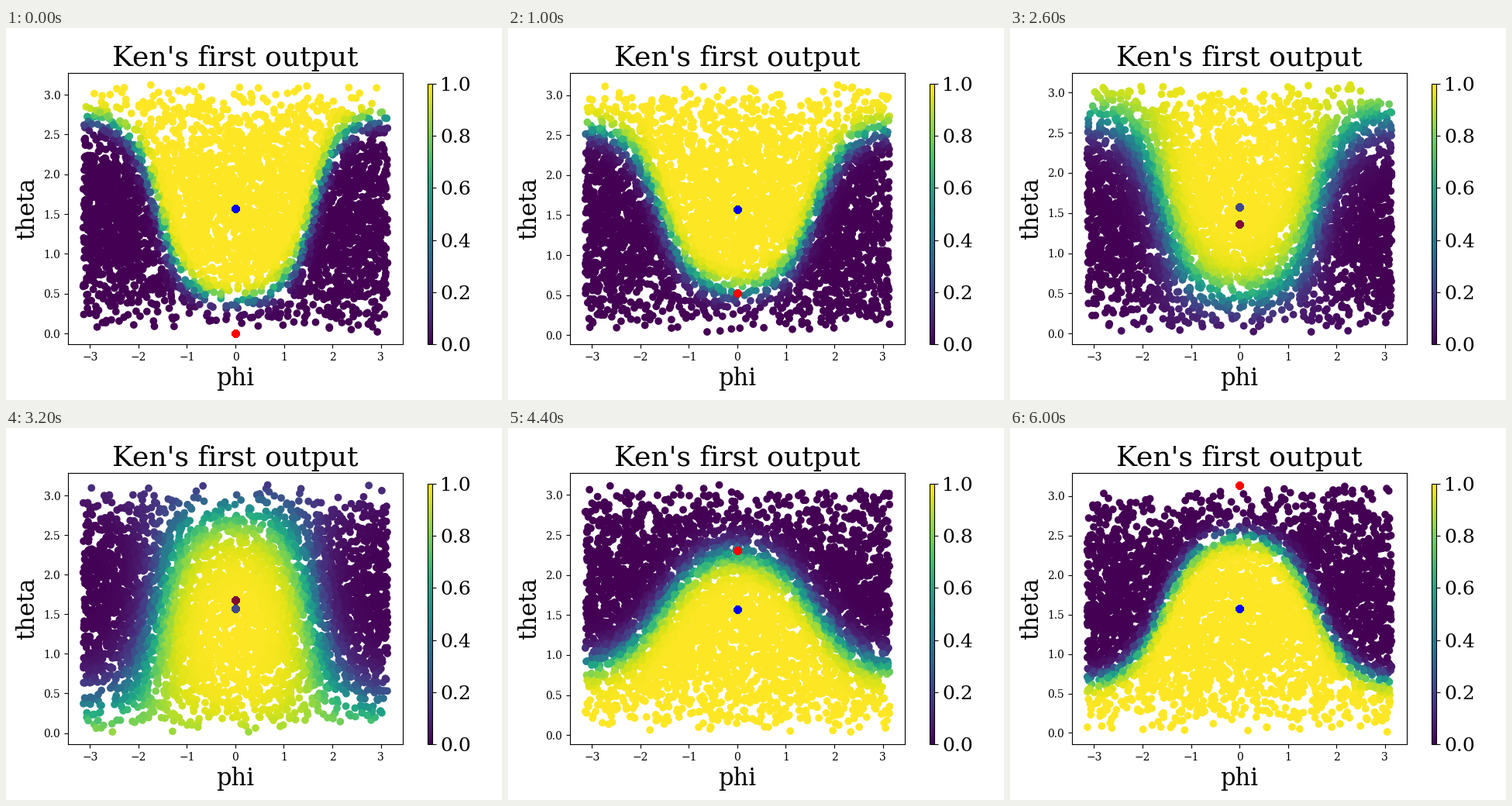
These frames come from a looping animation (640 px wide and 480 px high, 6200 ms). A matplotlib script:

```python
import numpy as np
import matplotlib.pyplot as plt
from matplotlib.animation import FuncAnimation

FRAMES, STEP = 31, 200
POINTS = 4000
FLIP = 15.5  # step at which the yellow side turns over

plt.rcParams["font.family"] = "DejaVu Serif"


def sample(i):
    """Uniform points on the sphere."""
    rng = np.random.default_rng(100 + i)
    phi = rng.uniform(-np.pi, np.pi, POINTS)
    theta = np.arccos(rng.uniform(-1, 1, POINTS))
    return phi, theta


def output(i, phi, theta):
    """Sigmoid across a tilted great circle, softest near the flip."""
    tilt = np.interp(i, (0, 9, 13, 18, 22, 30),
                     (.45, .76, .47, -.84, -1.2, -.77))
    gain = 5.2 + .86 * abs(i - FLIP)
    side = (np.cos(phi) + .05) * np.sin(theta) - tilt * np.cos(theta)
    return 1 / (1 + np.exp(-gain * side / np.hypot(1, tilt)))


def padded(lo, hi):
    pad = .05 * (hi - lo)
    return lo - pad, hi + pad


fig = plt.figure(figsize=(6.4, 4.8), dpi=100)
ax = fig.add_subplot()
fig.subplots_adjust(bottom=.15, right=.8)
ax.set_title("Ken's first output", fontsize=26)
ax.set_xlabel("phi", fontsize=22)
ax.set_ylabel("theta", fontsize=22)

cloud = ax.scatter(*sample(0), c=np.zeros(POINTS), vmin=0, vmax=1)
# repeated markers give the hard, overdrawn outline
stack = np.zeros(200)
blue = ax.scatter(stack, stack + np.pi / 2)
red = ax.scatter(stack, stack)

cax = fig.add_axes([.85, .15, .01, .7])
fig.colorbar(cloud, cax=cax)
cax.tick_params(labelsize=18)


def update(i):
    phi, theta = sample(i)
    cloud.set_offsets(np.column_stack([phi, theta]))
    cloud.set_array(output(i, phi, theta))

    setting = np.pi * i / (FRAMES - 1)
    red.set_offsets(np.column_stack([stack, stack + setting]))
    muted = abs(i - FLIP) < 5
    red.set_color("#800a35" if muted else "red")
    blue.set_color("#3f4791" if muted else "blue")

    ax.set_xlim(padded(phi.min(), phi.max()))
    ax.set_ylim(padded(theta.min(), max(theta.max(), setting)))
    return cloud, blue, red


anim = FuncAnimation(fig, update, frames=FRAMES, interval=STEP,
                     repeat=True, repeat_delay=0, blit=False)
plt.show()
```
